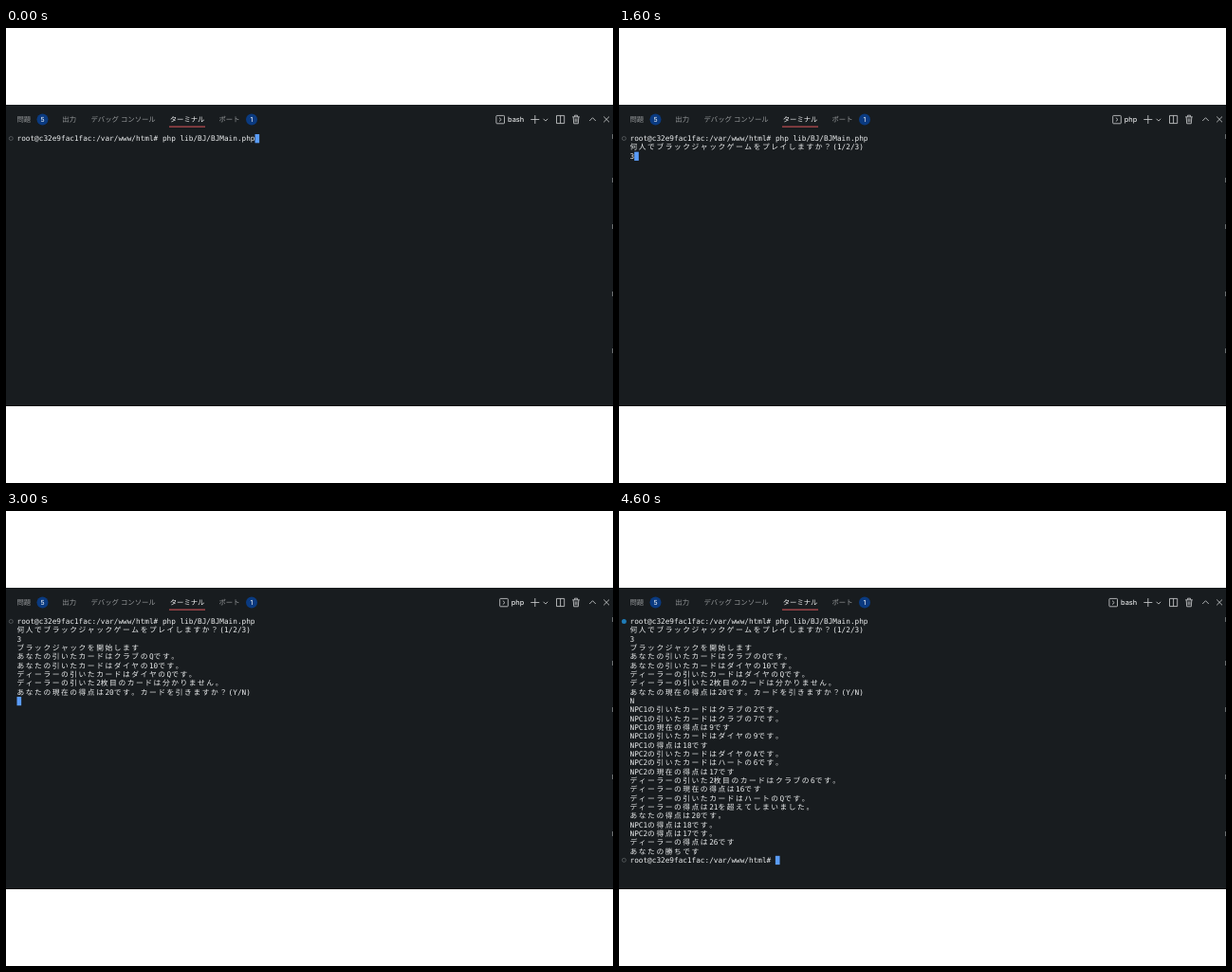
These frames come from a looping animation (640 by 480 pixels, 4800 ms). An HTML page:

```html
<!DOCTYPE html>
<html lang="ja">
<head>
<meta charset="utf-8">
<title>Terminal</title>
<style>
  html, body { margin: 0; width: 100%; height: 100%; overflow: hidden; background: #fff; }
  svg { display: block; width: 640px; height: 480px; }
  text { text-rendering: geometricPrecision; white-space: pre; }
  .term { font: 7.72px "DejaVu Sans Mono", "Noto Sans CJK JP", "Noto Sans CJK", monospace; fill: #eceeef; }
  .ui { font: 7.35px Inter, "Noto Sans CJK JP", "Noto Sans CJK", sans-serif; fill: #96999b; }
  .ui .on { fill: #f0f1f2; font-weight: 500; }
  .ui .num { fill: #fff; font-size: 7px; text-anchor: middle; }
  .ui .shell { fill: #e2e4e5; font-weight: 500; text-anchor: end; }
  .icon { fill: none; stroke: #c9cccd; stroke-width: .85; }
</style>
</head>
<body>
<svg viewBox="0 0 640 480">
  <rect y="81" width="640" height="318" fill="#181c1f"/>
  <rect y="398" width="640" height="1" fill="#0e1113"/>

  <g class="ui">
    <text x="11.5" y="99.2">問題</text>
    <text x="59.3" y="99.2">出力</text>
    <text x="89.5" y="99.2">デバッグ コンソール</text>
    <text x="172.7" y="99.2" class="on">ターミナル</text>
    <text x="224.5" y="99.2">ポート</text>
    <rect x="172" y="103.6" width="38" height="1" fill="#e0595c"/>
    <circle cx="38.5" cy="96.6" r="6" fill="#0a3a80"/>
    <text x="38.5" y="99.2" class="num">5</text>
    <circle cx="259" cy="96.6" r="6" fill="#0a3a80"/>
    <text x="259" y="99.2" class="num">1</text>
    <text id="shell" x="546.2" y="99" class="shell"></text>
  </g>

  <g class="icon">
    <g id="shellIcon">
      <rect x=".5" y="92.4" width="8.6" height="8.4" rx=".8"/>
      <path d="M3.6 94.6l2.2 2-2.2 2"/>
    </g>
    <path d="M553.3 96.5h9M557.8 92v9"/>
    <path d="M566.6 95.8l2.3 2.3 2.3-2.3"/>
    <path d="M580.5 92.4h8.2v8.2h-8.2zM584.6 92.4v8.2"/>
    <path d="M597.2 93.8h7.6M599.5 93.6v-1.4h3v1.4M598.2 94l.5 6.8h4.6l.5-6.8M600.2 95.4v3.9M601.9 95.4v3.9"/>
    <path d="M615.2 98l3.3-3.3 3.3 3.3"/>
    <path d="M630.2 93.5l5.8 5.8M636 93.5l-5.8 5.8"/>
  </g>

  <g id="edge" fill="#6c7072"></g>
  <circle id="firstMark" cx="5.3" cy="116.5" r="2"/>
  <circle id="lastMark" cx="5.3" cy="368.3" r="2" fill="none" stroke="#5d6265" stroke-width=".8"/>
  <rect id="cursor" width="4.65" height="9.3" fill="#5a9cf8"/>
  <g id="rows" class="term"></g>
</svg>

<script>
const LOOP = 4800, LEFT = 11.5, TOP = 112, CELL = 4.648, PITCH = 9.326;
const PROMPT = "root@c32e9fac1fac:/var/www/html# ";
const LINES = [
  PROMPT + "php lib/BJ/BJMain.php",
  "何人でブラックジャックゲームをプレイしますか？(1/2/3)",
  "3",
  "ブラックジャックを開始します",
  "あなたの引いたカードはクラブのQです。",
  "あなたの引いたカードはダイヤの10です。",
  "ディーラーの引いたカードはダイヤのQです。",
  "ディーラーの引いた2枚目のカードは分かりません。",
  "あなたの現在の得点は20です。カードを引きますか？(Y/N)",
  "N",
  "NPC1の引いたカードはクラブの2です。",
  "NPC1の引いたカードはクラブの7です。",
  "NPC1の現在の得点は9です",
  "NPC1の引いたカードはダイヤの9です。",
  "NPC1の得点は18です",
  "NPC2の引いたカードはダイヤのAです。",
  "NPC2の引いたカードはハートの6です。",
  "NPC2の現在の得点は17です",
  "ディーラーの引いた2枚目のカードはクラブの6です。",
  "ディーラーの現在の得点は16です",
  "ディーラーの引いたカードはハートのQです。",
  "ディーラーの得点は21を超えてしまいました。",
  "あなたの得点は20です。",
  "NPC1の得点は18です。",
  "NPC2の得点は17です。",
  "ディーラーの得点は26です",
  "あなたの勝ちです",
  PROMPT
];

// at: ms, rows: visible lines, row/col: cursor cell
const STEPS = [
  { at: 0, rows: 1, row: 0, col: 54, shell: "bash" },
  { at: 200, rows: 2, row: 2, col: 0, shell: "php" },
  { at: 1600, rows: 3, row: 2, col: 1, shell: "php" },
  { at: 2200, rows: 9, row: 9, col: 0, shell: "php" },
  { at: 3600, rows: 10, row: 9, col: 1, shell: "php" },
  { at: 4000, rows: 28, row: 27, col: 33, shell: "bash", done: true }
];

const $ = id => document.getElementById(id);
const set = (el, attrs) => {
  for (const k in attrs) el.setAttribute(k, attrs[k]);
  return el;
};
const add = (parent, tag, attrs) =>
  parent.appendChild(set(document.createElementNS("http://www.w3.org/2000/svg", tag), attrs));

// Wide characters take two terminal cells.
function cellXs(line) {
  let col = 0;
  return [...line].map(ch => {
    const x = LEFT + col * CELL;
    col += ch > "\x7f" ? 2 : 1;
    return x.toFixed(2);
  }).join(" ");
}

const rows = LINES.map((line, i) => {
  const el = add($("rows"), "text", { x: cellXs(line), y: TOP + i * PITCH + 7.1 });
  el.textContent = line;
  return el;
});

for (const y of [112, 158, 207, 278, 338])
  add($("edge"), "rect", { x: 639, y, width: 1, height: 5 });

let shown;
function show(step) {
  if (step === shown) return;
  shown = step;
  rows.forEach((el, i) => set(el, { visibility: i < step.rows ? "visible" : "hidden" }));
  set($("cursor"), { x: LEFT + step.col * CELL, y: TOP + step.row * PITCH });
  $("shell").textContent = step.shell;
  set($("shellIcon"), { transform: `translate(${step.shell === "bash" ? 516.4 : 520.2} 0)` });
  set($("firstMark"), step.done
    ? { fill: "#1f7cb8", stroke: "none", r: 2.5 }
    : { fill: "none", stroke: "#5d6265", "stroke-width": .8, r: 2 });
  set($("lastMark"), { visibility: step.done ? "visible" : "hidden" });
}

function tick() {
  const t = performance.now() % LOOP;
  show(STEPS.findLast(s => s.at <= t));
  requestAnimationFrame(tick);
}
tick();
</script>
</body>
</html>
```
